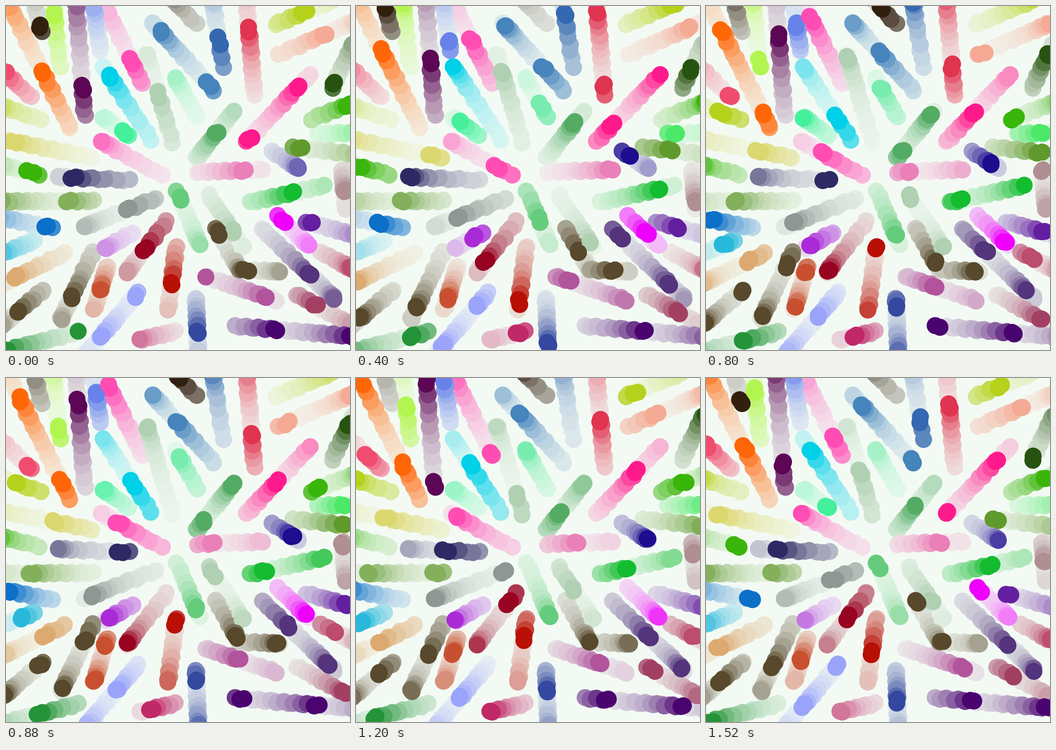
An HTML page with a canvas that plays this animation: 748x748 px, repeating every 1.6 s.

```html
<!DOCTYPE html>
<html lang="en">
<head>
<meta charset="utf-8">
<title>Drifting dots</title>
<style>
  html, body { margin: 0; width: 100%; height: 100%; overflow: hidden; background: #f3faf4; }
  canvas { display: block; }
</style>
</head>
<body>
<canvas id="stage" width="748" height="748"></canvas>
<script>
const ctx = document.getElementById('stage').getContext('2d');
const STEP = 80, STEPS = 20, RADIUS = 18.5, FADE = 0.89, WOBBLE = 2;
const PAPER = [243, 250, 244];
const dots = [];
let born = 0;

const mix = (a, b, k) => a + (b - a) * k;
const even = k => k;
const slowing = k => k + 0.7 * k * (1 - k);

// All dots added after this call start on the given step.
function wave(step) { born = step; }

// Fading colours of a trail; each shade holds for two steps.
function fadeOf(color) {
  const rgb = [1, 3, 5].map(i => parseInt(color.slice(i, i + 2), 16));
  return Array.from({ length: 2 * STEPS }, (_, age) => {
    const k = FADE ** (age - age % 2);
    return `rgb(${rgb.map((c, i) => Math.round(mix(PAPER[i], c, k)))})`;
  });
}

function add(ease, color, life, x0, y0, x1, y1) {
  const seed = dots.length * 1.7;
  const spots = Array.from({ length: life + 1 }, (_, s) => {
    const k = ease(s / life);
    return {
      x: mix(x0, x1, k) + WOBBLE * Math.sin(s * 2.4 + seed),
      y: mix(y0, y1, k) + WOBBLE * Math.cos(s * 1.9 + seed)
    };
  });
  dots.push({ born, spots, shades: fadeOf(color) });
}

// colour, life in steps, from x y, to x y
const glide = (...path) => add(even, ...path);
const settle = (...path) => add(slowing, ...path);

wave(2);
glide('#6882ea', 14, 205, 95, 190, -4);
settle('#ff4db4', 16, 338, 368, 206, 293);
settle('#78ecae', 13, 417, 243, 369, 158);
glide('#dcd870', 20, 188, 330, -8, 290);
glide('#e03450', 25, 540, 192, 523, -8);
glide('#4ce868', 11, 676, 278, 752, 276);
settle('#1f0c8f', 14, 580, 317, 636, 352);
settle('#aa2ad8', 12, 277, 492, 215, 528);
settle('#54347c', 36, 556, 484, 714, 636);
glide('#c02868', 13, 367, 708, 290, 726);

wave(6);
glide('#ff6608', 30, 140, 265, 6, -4);
settle('#00d0e8', 18, 315, 290, 213, 134);
settle('#b6d11c', 10, 74, 247, -8, 218);
settle('#32200f', 7, 415, 40, 365, -12);
glide('#54ac64', 25, 416, 328, 494, 230);
glide('#ea80b8', 19, 416, 361, 556, 356);
glide('#28b8dc', 11, 60, 511, -4, 537);
settle('#dcaa70', 21, 128, 538, -4, 602);
settle('#58492c', 27, 190, 533, 120, 680);
glide('#c85030', 25, 220, 566, 192, 660);
glide('#14bc30', 23, 530, 427, 690, 391);
settle('#bc4c70', 17, 686, 536, 758, 574);
glide('#3448a0', 22, 413, 634, 418, 755);

wave(9);
settle('#b2f550', 16, 117, 132, 102, -8);
glide('#f04c70', 12, 55, 199, -12, 135);
settle('#f4aa94', 24, 594, 105, 756, 34);
settle('#3ab50a', 17, 664, 246, 765, 207);
glide('#b08e92', 19, 731, 357, 739, 440);
settle('#302864', 17, 270, 379, 113, 372);
settle('#58492c', 24, 82, 617, -8, 693);
glide('#b81004', 18, 370, 522, 352, 663);
settle('#b0d0b2', 20, 441, 412, 516, 525);
glide('#4a0470', 32, 500, 696, 762, 719);

wave(12);
settle('#b0d0b2', 20, 362, 296, 306, 104);
glide('#b6d11c', 15, 586, 40, 710, -12);
glide('#84b05c', 27, 190, 424, -6, 425);
settle('#980322', 20, 350, 467, 262, 580);
glide('#a24064', 21, 632, 627, 748, 692);

wave(14);
glide('#5c0655', 22, 171, 238, 152, -8);
glide('#ff4db4', 18, 297, 170, 218, 6);
settle('#8e9794', 21, 327, 418, 172, 479);

wave(16);
settle('#3468b0', 13, 472, 132, 450, -8);

wave(18);
glide('#32200f', 7, 77, 57, 63, -4);
settle('#44f09c', 11, 268, 283, 213, 242);
settle('#4684bc', 30, 452, 183, 318, 36);
glide('#265410', 16, 709, 178, 757, 78);
glide('#ff1a8c', 26, 522, 296, 660, 150);
glide('#609a2c', 15, 626, 307, 755, 322);
settle('#3ab50a', 10, 72, 366, -8, 346);
glide('#0c70c8', 15, 99, 482, -12, 460);
glide('#9aa4fa', 30, 287, 624, 176, 754);
settle('#64cc7c', 17, 372, 402, 420, 517);
settle('#58492c', 17, 455, 482, 508, 574);
settle('#58492c', 15, 508, 574, 594, 577);
settle('#ee00fc', 15, 592, 457, 657, 519);
glide('#641fa0', 15, 654, 469, 756, 498);

wave(20);
glide('#b2549c', 23, 433, 588, 588, 640);
glide('#249438', 21, 156, 709, -10, 752);

// Oldest marks first, so that fresh ones cover them.
function draw(step) {
  ctx.fillStyle = `rgb(${PAPER})`;
  ctx.fillRect(0, 0, 748, 748);
  for (let age = 2 * STEPS - 1; age >= 0; age--) {
    for (const { born, spots, shades } of dots) {
      ctx.fillStyle = shades[age];
      const first = (step - age - born + 3 * STEPS) % STEPS;
      for (let i = first; i < spots.length; i += STEPS) {
        ctx.beginPath();
        ctx.arc(spots[i].x, spots[i].y, RADIUS, 0, 2 * Math.PI);
        ctx.fill();
      }
    }
  }
}

let shown = -1;
function tick() {
  const step = Math.floor(performance.now() / STEP) % STEPS;
  if (step !== shown) draw(shown = step);
  requestAnimationFrame(tick);
}
tick();
</script>
</body>
</html>
```
